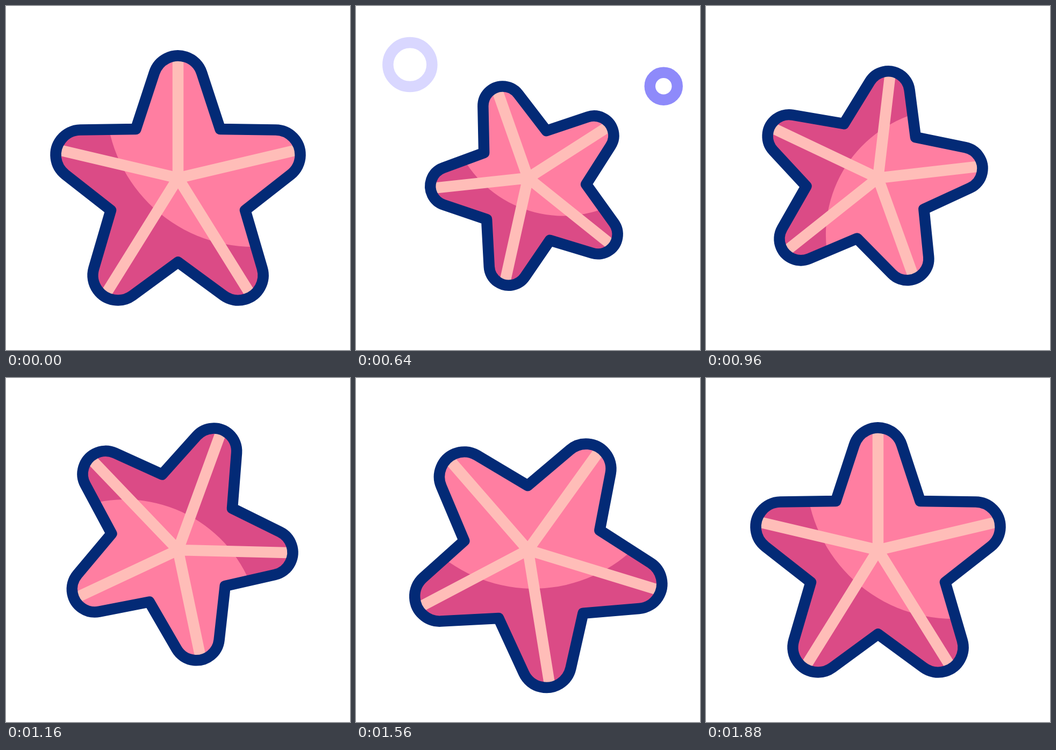
These frames come from a looping animation (640x640 px, 2 s). An HTML page with a canvas:

```html
<!DOCTYPE html>
<html lang="en">
<head>
<meta charset="utf-8">
<title>Starfish</title>
<style>
html, body { margin: 0; width: 100%; height: 100%; overflow: hidden; background: #fff; }
canvas { display: block; width: 640px; height: 640px; }
</style>
</head>
<body>
<canvas id="stage" width="640" height="640"></canvas>
<script>
const ctx = document.getElementById('stage').getContext('2d');
const LOOP = 2000, STEP = 40, LINE = 20.5, TIP = 46.5;
const NAVY = '#032a76', PINK = '#ff7ea1', SHADE = '#db4b86', RIB = '#ffbdb8';

// Coordinates relative to the star's centre, clockwise from the top arm.
const tips = [[0, -181], [181, -43], [112, 181], [-112, 181], [-181, -43]];
const notches = [[78.5, -91], [125, 60], [0, 156.5], [-125, 60], [-78.5, -91]];
const ribs = [[0, -228], [225, -53], [137, 220], [-137, 220], [-225, -53]];
const light = { x: 140, y: -146, r: 274 };

const clamp = v => Math.min(1, Math.max(0, v));
const span = (t, a, b) => clamp((t - a) / (b - a));
const ease = p => p * p * (3 - 2 * p);
const lerp = (a, b, p) => a + (b - a) * p;

// Goes from a to b until t1, then on to c until t2.
const swing = (t, a, b, c, t1, t2) =>
  t < t1 ? lerp(a, b, ease(t / t1)) : lerp(b, c, ease(span(t, t1, t2)));

// Direction from a tip to a notch, and the angle from there to the tangent point.
function tangent([cx, cy], [px, py]) {
  const dx = px - cx, dy = py - cy;
  return [Math.atan2(dy, dx), Math.acos(TIP / Math.hypot(dx, dy))];
}

function starPath(k) {
  const path = new Path2D();
  tips.forEach((tip, i) => {
    const [from, a] = tangent(tip, notches[(i + 4) % 5]);
    const [to, b] = tangent(tip, notches[i]);
    path.arc(tip[0] * k, tip[1] * k, TIP * k, from + a, to - b);
    path.lineTo(notches[i][0] * k, notches[i][1] * k);
  });
  path.closePath();
  return path;
}

function drawStar(t) {
  const turn = swing(t, 0, -41, 360, 444, 1836);
  const k = swing(t, 1, 0.773, 1, 480, 1626);
  const path = starPath(k);
  ctx.save();
  ctx.translate(320, 320);
  ctx.rotate(turn * Math.PI / 180);
  ctx.lineWidth = LINE;
  ctx.lineJoin = 'round';

  ctx.save();
  ctx.clip(path);
  ctx.fillStyle = SHADE;
  ctx.fillRect(-320, -320, 640, 640);
  ctx.fillStyle = PINK;
  ctx.beginPath();
  ctx.arc(light.x * k, light.y * k, light.r * k, 0, 7);
  ctx.fill();
  ctx.strokeStyle = RIB;
  ctx.beginPath();
  for (const [x, y] of ribs) {
    ctx.moveTo(0, 0);
    ctx.lineTo(x * k, y * k);
  }
  ctx.stroke();
  ctx.restore();

  ctx.strokeStyle = NAVY;
  ctx.stroke(path);
  ctx.restore();
}

const bubbles = [
  { start: 120, end: 760, fadeIn: 100, fadeOut: 240, r: 41, color: '#b4b0ff',
    x: [81, 85], y: [248, 95], bulge: 29 },
  { start: 440, end: 920, fadeIn: 100, fadeOut: 200, r: 25.5, color: '#8e8afa',
    x: [571, 574], y: [191, 80], bulge: 0 }
];

function drawBubble(b, t) {
  if (t <= b.start || t >= b.end) return;
  const p = span(t, b.start, b.end);
  const x = lerp(...b.x, p) + b.bulge * Math.sin(Math.PI * p);
  const y = lerp(...b.y, ease(p));
  ctx.globalAlpha = Math.min(1, (t - b.start) / b.fadeIn, (b.end - t) / b.fadeOut);
  ctx.strokeStyle = b.color;
  ctx.lineWidth = LINE;
  ctx.beginPath();
  ctx.arc(x, y, b.r, 0, 7);
  ctx.stroke();
  ctx.globalAlpha = 1;
}

const begin = performance.now();

function frame() {
  const t = Math.floor((performance.now() - begin) % LOOP / STEP) * STEP;
  ctx.fillStyle = '#fff';
  ctx.fillRect(0, 0, 640, 640);
  bubbles.forEach(b => drawBubble(b, t));
  drawStar(t);
  requestAnimationFrame(frame);
}
frame();
</script>
</body>
</html>
```
